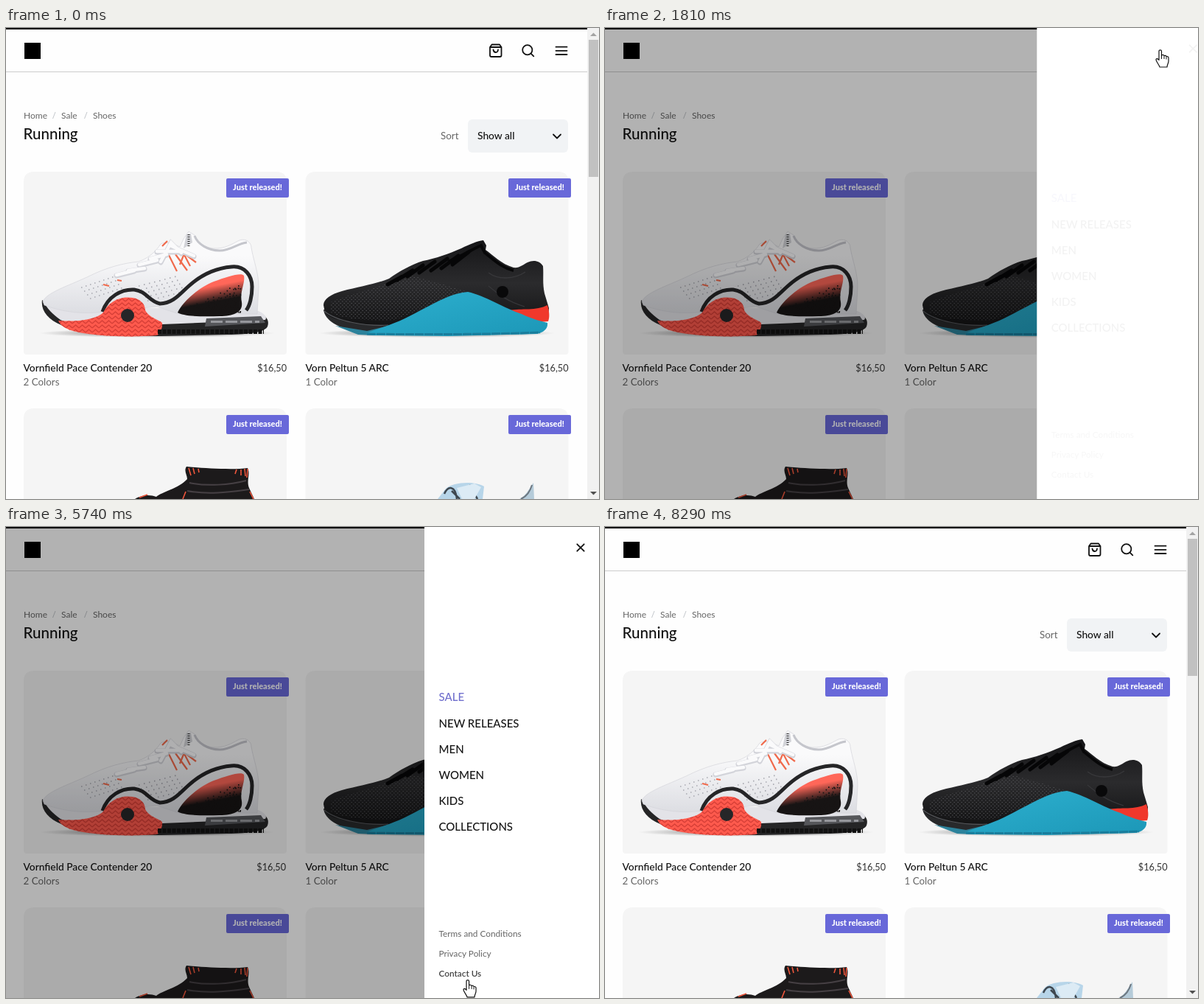
These frames come from a looping animation (805 px wide and 639 px high, 8.36 s). An HTML page:

```html
<!DOCTYPE html>
<html lang="en">
<head>
<meta charset="utf-8">
<title>Shoe store</title>
<style>
html, body { margin: 0; width: 100%; height: 100%; overflow: hidden; background: #fff; }
svg { display: block; font: 13.4px Lato, "Open Sans", sans-serif; fill: #666; }
.ink { fill: #111; font-weight: 500; }
.name { font-size: 13.8px; }
.small { font-size: 12px; }
.tag { font-size: 11px; font-weight: 800; fill: #fff; text-anchor: middle; }
.price { font-size: 12.7px; fill: #333; text-anchor: end; }
.line { fill: none; stroke: #111; stroke-width: 1.8; stroke-linecap: round; stroke-linejoin: round; }
.nav { font-size: 15px; font-weight: 500; fill: #161616; }
.nav.sale { fill: #706fcd; }
.nav.on { font-weight: 800; }
.foot { font-size: 11.8px; fill: #666; }
.foot.on { font-weight: 600; fill: #444; }
.tip { font-family: "Open Sans", "Noto Sans", sans-serif; }
</style>
</head>
<body>
<svg width="805" height="639" viewBox="0 0 805 639">
<defs>
  <path id="card" d="M24 209Q24 195 38 195H367Q381 195 381 209V439Q381 443 377 443H28Q24 443 24 439Z" fill="#f5f5f5"/>
  <g id="badge"><rect x="299" y="204" width="85" height="26" rx="2" fill="#6868d9"/><text class="tag" x="341.5" y="220">Just released!</text></g>
  <path id="sole" d="M71 397C95 399 122 396 132 386C139 371 156 363 172 366C184 368 189 376 189 383C194 393 208 396 212 400C213 407 209 414 205 417C168 420 120 418 95 412C82 409 74 404 71 397Z"/>
  <linearGradient id="white" x2="0" y2="1"><stop offset=".3" stop-color="#fafafb"/><stop offset="1" stop-color="#dcdde2"/></linearGradient>
  <linearGradient id="heel" x2=".3" y2="1"><stop offset=".4" stop-color="#ff6759"/><stop offset=".75" stop-color="#171414"/></linearGradient>
  <linearGradient id="black" x2="0" y2="1"><stop stop-color="#151517"/><stop offset=".5" stop-color="#2b2b2d"/><stop offset="1" stop-color="#131314"/></linearGradient>
  <linearGradient id="blue" x2="1" y2="1"><stop stop-color="#2db0cf"/><stop offset="1" stop-color="#1c97b7"/></linearGradient>
  <radialGradient id="shade"><stop offset=".6" stop-color="#b9b9b9"/><stop offset="1" stop-color="#b9b9b9" stop-opacity="0"/></radialGradient>
  <pattern id="tread" width="9" height="6" patternUnits="userSpaceOnUse"><path d="M0 5L4.5 1L9 5" fill="none" stroke="#d63f37" stroke-width="1.4"/></pattern>
  <pattern id="mesh" width="5" height="5" patternUnits="userSpaceOnUse"><path d="M1 1h1.5M3.5 3.5h1.5" stroke="#505053"/></pattern>
</defs>
<rect width="805" height="639" fill="#fefefe"/>
<g id="page">
  <rect id="bar" width="789" height="2" fill="#111"/>
  <rect id="rule" y="59" width="789" height="1" fill="#ccc"/>
  <rect x="25" y="20" width="22" height="22" fill="#000"/>
  <g class="line">
    <g class="shift"><path d="M657 26L659.5 22.5H670L672.5 26V37Q672.5 39 670.5 39H659Q657 39 657 37ZM657 26H672.5M661.5 29.5Q662 33 664.8 33T668 29.5"/></g>
    <circle cx="707.8" cy="29.8" r="6.6"/><path d="M712.6 34.6L716.3 38.3M746.5 25.7H761.5M746.5 30.8H761.5M746.5 36H761.5"/>
  </g>
  <g class="small"><text x="24" y="123">Home</text><text x="75" y="123">Sale</text><text x="118" y="123">Shoes</text></g>
  <path d="M63.5 123L67 114M106.5 123L110 114" stroke="#c4c8cc"/>
  <text class="ink" x="23.5" y="151" font-size="20.5">Running</text>
  <rect x="627" y="124" width="136" height="45" rx="6" fill="#f1f3f5"/>
  <g class="shift"><text x="590" y="151">Sort</text><text class="ink" x="640" y="151" font-size="13.8">Show all</text><path class="line" d="M743 144.5L748 149.5L753 144.5"/></g>
  <use href="#card"/><use href="#card" x="382.5"/><use href="#card" y="321"/><use href="#card" x="382.5" y="321"/>

  <g id="court">
    <ellipse cx="205" cy="414" rx="160" ry="6" fill="url(#shade)"/>
    <path d="M49 369C47 383 57 396 75 403C95 413 125 418 210 418L300 416C332 416 352 412 355 405C358 396 353 390 344 388L210 392L75 388Z" fill="#252526"/>
    <path d="M52 372C80 384 115 386 135 378L343 384C351 388 355 392 352 396L285 399L212 402C180 410 90 404 74 396C63 388 55 380 52 372Z" fill="#e3e3e8"/>
    <path d="M272 394L346 391L352 400L270 405Z" fill="#55565a"/><path d="M278 398.5H344" stroke="#96979c" stroke-width="3" stroke-dasharray="16 4"/>
    <path d="M50 371C55 359 84 350 110 338C138 324 160 319 180 317C196 311 204 302 210 293C217 289 228 293 236 297L241 286L248 276L256 281C260 292 272 300 287 299C301 298 310 291 317 288C326 285 333 291 333 298C336 316 343 332 343 351L341 388H235L205 378L132 385C105 389 75 385 52 376Z" fill="url(#white)" stroke="#d4d5da" stroke-width=".7"/>
    <path d="M256 282C260 293 274 302 290 302S314 292 327 291" fill="none" stroke="#c5c6cc" stroke-width="3"/>
    <path d="M245 280L251 279L253 291L241 299Z" fill="#d2d3d8"/><path d="M248 280V296" stroke="#333" stroke-width="3" stroke-dasharray="1 2"/>
    <path d="M221 308L232 330M230 307L246 329M240 304L250 323M236 321L242 306L258 318M212 296L219 289M180 321L190 326M132 348L140 350M151 342L157 343" fill="none" stroke="#f06a4c" stroke-width="2.2"/>
    <path d="M150 336L174 330M166 330L188 327M181 322L205 316M196 314L218 308M205 304L236 304M210 318L224 292L238 306M225 297L255 310" fill="none" stroke="#d3d4da" stroke-width="7" stroke-linecap="round"/>
    <path d="M150 335L174 329M166 329L188 326M181 321L205 315M196 313L218 307M205 303L236 303M210 317L224 291L238 305M225 296L255 309" fill="none" stroke="#fafafb" stroke-width="4.5" stroke-linecap="round"/>
    <path id="holes" stroke="#a7a8af" stroke-width="1.7"/>
    <path d="M131 385C138 364 157 354 174 355C191 357 194 371 209 374C226 374 236 361 246 352C262 337 282 326 306 324C325 322 334 337 334 351C334 364 331 377 326 383" fill="none" stroke="#252527" stroke-width="5"/>
    <path d="M233 386C240 371 262 352 282 344C301 337 320 331 323 336C325 346 317 358 320 372C322 385 310 391 290 391C265 392 240 391 233 386Z" fill="url(#heel)"/>
    <path id="specks" stroke="#171414" stroke-width="1.8"/>
    <use href="#sole" fill="#ff5a4d"/><use href="#sole" fill="url(#tread)"/>
    <path d="M206 412H350" stroke="#111" stroke-width="6" stroke-dasharray="5 1.5"/>
    <circle cx="165" cy="390" r="9" fill="#262628"/>
  </g>

  <g id="trainer">
    <ellipse cx="585" cy="414" rx="160" ry="6" fill="url(#shade)"/>
    <path d="M431 382C433 397 450 407 478 412L500 415L530 405L490 390Z" fill="#28292b"/>
    <path d="M447 404L490 411L520 404L500 417L478 416Z" fill="#2c829b"/>
    <path d="M431 376C431 368 441 361 456 357C480 351 503 347 520 340C534 330 550 321 566 316C582 313 602 306 618 299C630 293 640 289 648 288L652 295L651 301C661 308 672 320 689 325C697 326 702 321 708 318C716 314 725 316 729 323C730 336 728 346 731 360L737 380L736 394L690 390L627 362L530 404C490 404 440 398 433 386Z" fill="url(#black)"/>
    <path d="M440 372C475 358 515 351 545 334L625 357L528 396C490 398 450 394 440 385Z" fill="url(#mesh)"/>
    <path d="M600 317C618 310 635 299 645 295L650 305C661 313 672 325 689 329" fill="none" stroke="#070708" stroke-width="4"/>
    <path d="M655 332C668 342 690 341 705 331M655 350C667 360 680 371 704 378" fill="none" stroke="#38383b" stroke-width="1.3"/>
    <path d="M518 348L538 337M531 342L552 329M545 337L566 322M561 332L582 317M577 329L599 313M591 326L614 309M606 321L628 304" stroke="#060607" stroke-width="5" stroke-linecap="round"/>
    <path d="M432 384C448 398 489 405 519 403" fill="none" stroke="#54565a" stroke-width="1.2"/>
    <path d="M683 383C700 380 720 384 735 376C738 386 738 393 736 398C718 400 700 397 683 387Z" fill="#f0382c"/>
    <path d="M489 414L520 403C558 390 594 360 627 358C650 363 678 381 700 388C714 395 728 398 735 400C736 408 730 413 720 415L600 418L500 417Z" fill="url(#blue)"/>
    <path d="M490 415C560 416 650 416 725 413" fill="none" stroke="#197d9c" stroke-width="3" stroke-dasharray="12 1"/>
    <circle cx="674" cy="358" r="8" fill="#09090a"/>
  </g>

  <path d="M175 639C188 632 197 634 204 636C212 629 234 625 246 612C246 606 241 601 245 595C263 597 309 600 328 597C332 605 326 614 330 624L337 639Z" fill="#1c1a1b"/>
  <path d="M249 617C272 622 304 620 326 614M246 628C276 634 307 629 330 626" fill="none" stroke="#464044" stroke-width="2"/>
  <path d="M248 597L251 607M254 597L256 605M261 598L262 603M313 599L311 605M319 599V607M324 598L325 608M328 598L327 610M181 637L192 633M331 629L336 639M240 639L244 629" stroke="#f0563c" stroke-width="1.6"/>

  <path d="M586 639L597 625C606 616 636 614 649 622L647 639Z" fill="#b7d5e9"/>
  <path d="M595 632C600 621 610 620 612 639M605 628L616 639M629 620L640 639" fill="none" stroke="#3e474f" stroke-width="2.5"/>
  <path d="M612 624L636 618L645 623L636 639H619Z" fill="#dcebf5"/>
  <path d="M697 639C705 635 710 626 716 617L717 639Z" fill="#b5cbd9"/><path d="M699 639Q710 634 714 620" fill="none" stroke="#6c7780" stroke-width="2"/>

  <use href="#badge"/><use href="#badge" y="321"/>
  <g class="shift"><use href="#badge" x="383"/><use href="#badge" x="383" y="321"/></g>
  <text class="ink name" x="23.5" y="466">Vornfield Pace Contender 20</text><text x="23.5" y="485">2 Colors</text>
  <text class="ink name" x="406.5" y="466">Vorn Peltun 5 ARC</text><text x="406.5" y="485">1 Color</text>
  <g class="shift"><text class="price" x="381" y="466">$16,50</text><text class="price" x="763.5" y="466">$16,50</text></g>
</g>
<g id="scroll"><rect x="789" width="16" height="639" fill="#f1f1f1"/><rect x="791" y="16" width="13" height="186" fill="#c1c1c1"/><path d="M793 11L797.5 6.5L802 11Z" fill="#a3a3a3"/><path d="M793 629L797.5 633.5L802 629Z" fill="#505050"/></g>
<g id="inspect">
  <rect width="789" height="639" fill="#6fa8dc" opacity=".66"/>
  <rect x="-5" y="610" width="158" height="35" rx="4" fill="#345" opacity=".2"/>
  <rect x="-5" y="611" width="157" height="35" rx="3" fill="#fff"/>
  <text class="tip" x="9" y="631" font-size="12.4" font-weight="700" fill="#86509b">html</text><text class="tip" x="47" y="631" font-size="11.4" fill="#444">988.75 × 2616.05</text>
</g>
<rect id="dim" width="805" height="639" fill="#000"/>
<g id="drawer">
  <rect x="568" width="260" height="639" fill="#fff"/>
  <g id="menu"><path class="line" d="M775.3 23.3L784.7 32.7M784.7 23.3L775.3 32.7"/></g>
</g>
<g id="cursor" stroke="#111" fill="#fff" stroke-linejoin="round">
  <g id="hand"><path d="M-2 1.5C-2-.8 1.5-.8 1.5 1.5V7.5C2 5.8 5 6 5 8C6 6.8 8 7.2 8 9C9 8.2 11 8.8 11 10.5V15C11 18 9 19.5 9 23H-1C-1.5 20-6 15.5-6 13C-6 11-3.8 11-2 13.5Z" stroke-width="1.2"/><path d="M1.5 8V12M5 8.5V12M8 9.5V12.5" fill="none"/></g>
  <path id="arrow" d="M0 0V16.5L4 12.8L6.6 18.8L9.2 17.7L6.6 11.8H12Z"/>
</g>
</svg>
<script>
const LOOP = 8360, OPEN = 1170, CLOSE = 7940;
const $ = id => document.getElementById(id);
const show = (id, on) => $(id).style.display = on ? "" : "none";
const clamp = v => Math.min(1, Math.max(0, v));

function bezier(x1, y1, x2, y2) {
  const at = (a, b, s) => 3 * a * s * (1 - s) ** 2 + 3 * b * s * s * (1 - s) + s ** 3;
  return x => {
    let lo = 0, hi = 1;
    for (let i = 0; i < 24; i++) {
      const mid = (lo + hi) / 2;
      if (at(x1, x2, mid) < x) lo = mid; else hi = mid;
    }
    return at(y1, y2, hi);
  };
}
const ease = bezier(.25, .1, .25, 1);
const slide = bezier(0, .6, .32, 1.06);

// Menu links: label, baseline, hover top and bottom
const links = [
  ["SALE", 236, 213, 249], ["NEW RELEASES", 272, 249, 284], ["MEN", 307, 284, 319],
  ["WOMEN", 342, 319, 354], ["KIDS", 377, 354, 389], ["COLLECTIONS", 412, 389, 424],
  ["Terms and Conditions", 556, 539, 566], ["Privacy Policy", 583, 566, 593], ["Contact Us", 610, 593, 621]
].map(([label, y, top, bottom], i) => {
  const el = document.createElementNS("http://www.w3.org/2000/svg", "text");
  el.setAttribute("x", 587.5);
  el.setAttribute("y", y);
  el.setAttribute("class", i < 6 ? "nav" : "foot");
  if (!i) el.classList.add("sale");
  el.textContent = label;
  $("menu").append(el);
  return { el, top, bottom };
});

// Speckled heel and perforated upper
let seed = 7;
const rand = () => (seed = seed * 16807 % 2147483647) / 2147483647;
let specks = "", holes = "";
for (let i = 0; i < 260; i++) {
  const x = 244 + rand() * 74, top = 384 - (x - 236) * .52;
  const y = top + Math.sqrt(rand()) * (386 - top);
  specks += `M${x.toFixed(1)} ${y.toFixed(1)}h1.6`;
}
for (let r = 0; r < 5; r++) for (let i = 0; i < 8; i++) {
  holes += `M${180 + i * 7 + r * 3} ${350 - i * 1.8 + r * 5}h1.5`;
  if (r < 4) holes += `M${102 + i * 6 + r * 4} ${352 - i * 2 + r * 5}h1.5`;
}
$("specks").setAttribute("d", specks);
$("holes").setAttribute("d", holes);

// Pointer stops: time, x, y
const stops = [
  [520, 815, 150], [760, 775, 60], [950, 755, 32], [1320, 754, 30], [1900, 754, 30],
  [2300, 720, 120], [2650, 622, 226], [3120, 607, 293], [3520, 609, 334], [3950, 612, 378],
  [4200, 614, 410], [4430, 616, 400], [4800, 618, 440], [5260, 622, 497], [5740, 627, 615],
  [6140, 640, 563], [6500, 700, 410], [6890, 772, 265], [7030, 771, 186], [7450, 792, 45],
  [7700, 781, 24], [7940, 781, 24], [8120, 820, 40]
];
function pointer(t) {
  const i = stops.findIndex(s => s[0] > t);
  if (i < 1) return [-50, -50];
  const [a, b] = [stops[i - 1], stops[i]], k = (t - a[0]) / (b[0] - a[0]);
  return [1, 2].map(n => a[n] + (b[n] - a[n]) * k);
}

function draw(t) {
  const open = t >= OPEN && t < CLOSE;
  show("scroll", !open);
  show("inspect", t >= 70 && t < 480);
  show("drawer", open);
  $("bar").setAttribute("width", open ? 788 : 789);
  $("rule").setAttribute("width", open ? 788 : 789);
  document.querySelectorAll(".shift").forEach(el => el.setAttribute("transform", `translate(${open ? -1 : 0})`));
  $("dim").setAttribute("opacity", open ? .3 * ease(clamp((t - OPEN) / 500)) : 0);
  $("drawer").setAttribute("transform", `translate(${237 * (1 - slide(clamp((t - OPEN - 400) / 500)))})`);
  $("menu").setAttribute("opacity", ease(clamp((t - OPEN - 600) / 600)));

  const [x, y] = pointer(t);
  let hand = t < 1900 ? x < 765 : open && x > 768 && y < 46;
  for (const { el, top, bottom } of links) {
    const on = open && t > 1900 && y >= top && y < bottom;
    el.classList.toggle("on", on);
    hand = hand || on;
  }
  $("cursor").setAttribute("transform", `translate(${x} ${y})`);
  show("hand", hand);
  show("arrow", !hand);
}

const start = performance.now();
(function tick() {
  draw((performance.now() - start) % LOOP);
  requestAnimationFrame(tick);
})();
</script>
</body>
</html>
```
